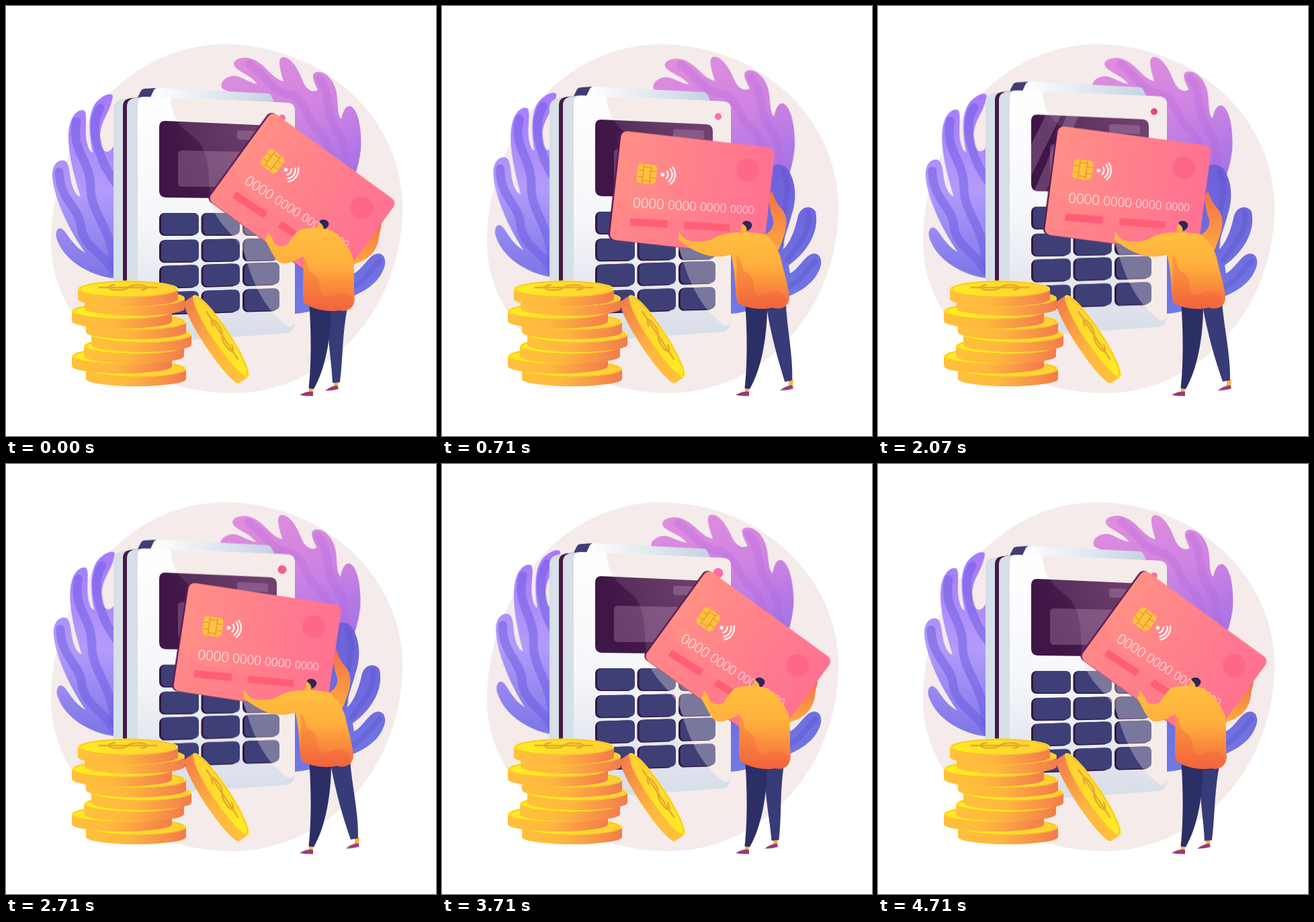
An HTML page without scripts that plays this animation: 640x640 px, repeating every 4780 ms.

```html
<!DOCTYPE html>
<html lang="en">
<head>
<meta charset="utf-8">
<title>Card payment</title>
<style>
  html, body { margin: 0; height: 100%; overflow: hidden; background: #fff; }
  svg { display: block; width: 100vw; height: 100vh; }

  :root { --loop: 4780ms; --sine: cubic-bezier(.37, 0, .63, 1); }
  .move { animation: var(--name) var(--loop) var(--sine) infinite; }
  .sway { animation: sway 2390ms var(--sine) infinite; }
  .left { --turn: 3deg; transform-origin: 222px 470px; }
  .right { --turn: -3.1deg; transform-origin: 392px 298px; }
  .terminal { --name: bob; }
  .light { --name: light; }
  .glint { --name: glint; animation-timing-function: linear; }
  .card { --name: card; }
  .shirt { --name: shirt; }
  .arm { --name: arm; }
  .head { --name: head; }
  .fold { --name: fold; }
  .leg { --name: leg; }
  .shoe { --name: shoe; }

  @keyframes sway { 50% { transform: rotate(var(--turn)); } }
  @keyframes bob { 50% { transform: translateY(-9.8px); } }
  @keyframes light {
    0%, 30% { r: 5px; fill: #f86fa0; }
    43% { r: 5px; fill: #e5447d; }
    67%, 74% { r: 7.5px; fill: #f86fa0; }
  }
  @keyframes glint {
    0%, 37.7% { transform: translateX(-150px); }
    52.3%, 100% { transform: translateX(260px); }
  }
  @keyframes card {
    0% { transform: translate(441px, 290px) rotate(36deg); animation-timing-function: cubic-bezier(.12, 0, .39, 0); }
    6.9% { transform: translate(407px, 273px) rotate(23deg); animation-timing-function: cubic-bezier(.61, 1, .88, 1); }
    13.8% { transform: translate(372.5px, 279.5px) rotate(6.4deg); }
    23%, 53.6% { transform: translate(372px, 274px) rotate(7.5deg); animation-timing-function: cubic-bezier(.12, 0, .39, 0); }
    67.2% { transform: translate(407.5px, 270px) rotate(25deg); animation-timing-function: cubic-bezier(.61, 1, .88, 1); }
    78.5%, 100% { transform: translate(441px, 290px) rotate(36deg); }
  }
  @keyframes shirt {
    0%, 78.5%, 100% { d: path("M436 334C444 329 468 330 481 333C494 338 510 356 517 376C519 395 517 415 519 436C518 450 508 456 496 453C480 456 458 452 444 442C440 430 444 400 442 372C432 379 418 386 408 382C398 376 394 362 386 349L390 337C394 343 399 348 399 353C404 358 414 360 420 354C426 345 430 338 436 334Z"); }
    14%, 53.6% { d: path("M428 338C440 336 462 336 480 340C492 348 500 362 504 374C508 395 516 415 517 435C516 448 504 453 492 449C476 453 452 450 440 442C436 430 437 395 430 370C418 374 402 374 388 369C374 364 362 356 352 348L353 336C355 341 360 345 364 348C372 352 388 352 400 348C410 342 420 339 428 338Z"); }
  }
  @keyframes arm {
    0%, 78.5%, 100% { d: path("M497 345C510 352 525 355 535 345C542 338 548 333 554 331L558 321C561 327 556 332 555 345C552 365 540 378 518 384C510 385 500 370 497 345Z"); }
    14%, 53.6% { d: path("M476 342C490 338 498 325 490 310C488 298 486 290 486 283L491 275C495 285 495 290 508 305C515 316 513 330 508 345C504 358 500 364 498 368C490 370 480 360 476 342Z"); }
  }
  @keyframes head { 14%, 53.6% { transform: translate(-19px, 2px); } 78.5% { transform: none; } }
  @keyframes fold { 14%, 53.6% { transform: translate(-4px, -3px); } 78.5% { transform: none; } }
  @keyframes leg {
    0%, 83.9%, 100% { d: path("M479 446C478 500 485 530 486 561L497 560C502 520 500 490 509 444Z"); }
    18.8%, 60.7% { d: path("M483 446C493 500 505 535 513 559L524 557C525 520 515 480 512 440Z"); }
  }
  @keyframes shoe { 18.8%, 60.7% { transform: translate(31px, -.5px); } 83.9% { transform: none; } }
</style>
</head>
<body>
<svg viewBox="0 0 640 640">
  <defs>
    <linearGradient id="violet" x2="0" y2="1"><stop stop-color="#a678fb"/><stop offset=".5" stop-color="#b29bfb"/><stop offset="1" stop-color="#7671e4"/></linearGradient>
    <linearGradient id="orchid" x2=".3" y2="1"><stop stop-color="#e18fdc"/><stop offset=".5" stop-color="#cf83e2"/><stop offset="1" stop-color="#a272e6"/></linearGradient>
    <linearGradient id="blue" x2="0" y2="1"><stop stop-color="#705fda"/><stop offset="1" stop-color="#7079e4"/></linearGradient>
    <linearGradient id="face" x2="0" y2="1"><stop stop-color="#fff"/><stop offset=".5" stop-color="#f6f7fa"/><stop offset="1" stop-color="#d9dde9"/></linearGradient>
    <linearGradient id="lid"><stop stop-color="#fff"/><stop offset="1" stop-color="#c6d2e2"/></linearGradient>
    <linearGradient id="screen" x2="1" y2="-.3"><stop stop-color="#3f1646"/><stop offset="1" stop-color="#6a3167"/></linearGradient>
    <linearGradient id="plastic"><stop stop-color="#ff8f85"/><stop offset="1" stop-color="#ff7192"/></linearGradient>
    <linearGradient id="rim"><stop stop-color="#ffc03b"/><stop offset=".4" stop-color="#ffb83f"/><stop offset="1" stop-color="#f27c4b"/></linearGradient>
    <linearGradient id="gold"><stop stop-color="#ffec22"/><stop offset="1" stop-color="#ffd033"/></linearGradient>
    <linearGradient id="cloth" x2="0" y2="1"><stop stop-color="#ffc03e"/><stop offset=".45" stop-color="#ffae3d"/><stop offset="1" stop-color="#f4663f"/></linearGradient>
    <linearGradient id="sleeve" x2="0" y2="1"><stop stop-color="#f2704a"/><stop offset="1" stop-color="#ffab3d"/></linearGradient>
    <clipPath id="glass"><path d="M237 171L394 178Q403 179 403 188V277Q403 287 394 287L237 285Q228 284 228 275V180Q228 171 237 171Z"/></clipPath>
    <clipPath id="edge"><rect x="-115" y="-81.5" width="230" height="163" rx="9"/></clipPath>
    <path id="sheen" d="M245 137C247 175 268 185 285 200C306 225 300 260 305 290C310 325 345 340 356 372C366 408 384 454 422 478Q430 476 430 466V156Q430 145 419 144Z" fill="#f4ebea"/>
    <g id="keys">
      <g fill="#33163f"><rect y="-17" width="56" height="34" rx="8"/><rect x="62.500" y="-17" width="54" height="34" rx="8"/><rect x="124" y="-17" width="52" height="34" rx="8"/></g>
      <g fill="#3f3f78"><rect x="3" y="-17" width="56" height="32.5" rx="7"/><rect x="65.500" y="-17" width="54.500" height="32.5" rx="7"/><rect x="127" y="-17" width="52" height="32.5" rx="7"/></g>
    </g>
    <g id="coin">
      <path d="M-74.5 0V15A74.5 11 0 0 0 74.5 15V0Z" fill="url(#rim)"/>
      <ellipse rx="74.5" ry="12.5" fill="#ffe62c"/>
      <ellipse cy=".5" rx="71.500" ry="11.3" fill="url(#gold)" stroke="#f6b036"/>
      <path d="M9-9C5-16-10-15-9-6C-8 2 9-2 9 7C9 15-6 16-10 9M0-21V21" transform="translate(0 -2) scale(2.1 .42) rotate(90)" fill="none" stroke="#e6a930" stroke-width="2.5" vector-effect="non-scaling-stroke"/>
    </g>
  </defs>

  <path d="M325 57A265 243 0 0 1 590 300A252 276 0 0 1 338 576A271 224 0 0 1 67 352A258 295 0 0 1 325 57Z" fill="#f4ebea"/>

  <g class="sway left">
    <path fill="url(#violet)" d="M165 406C120 402 84 375 75 345C73 335 77 330 82 331C91 335 97 356 118 367C98 340 72 290 69 255C68 235 78 228 87 230C95 234 94 250 98 265C101 276 106 283 111 284C97 240 87 195 97 170C103 156 112 153 117 156C122 165 116 185 121 205C123 213 126 218 129 218C121 180 123 150 140 138C150 130 158 130 159 134C155 160 140 170 140 195C140 225 160 225 166 190L200 190V420Z"/>
    <g fill="none" stroke="#6a5be0" stroke-opacity=".5" stroke-width="13" stroke-linecap="round">
      <path d="M105 172C96 215 126 230 126 270C126 310 158 330 160 385"/>
      <path d="M79 247C80 290 110 300 112 330C116 360 148 370 160 396"/>
      <path d="M140 152C122 180 140 235 165 265"/>
    </g>
  </g>

  <g class="sway right">
    <path fill="url(#orchid)" d="M322 123C316 112 330 103 342 104C354 107 362 114 374 116C362 100 340 97 339 86C340 79 348 77 358 77C385 80 393 108 413 112C408 95 403 78 412 76C424 76 434 92 441 110C446 124 456 130 464 125C457 110 453 100 463 98C478 97 492 115 493 137C494 152 494 165 499 168C502 155 506 148 513 149C525 155 530 185 528 215C525 240 515 270 500 292L430 300L400 160Z"/>
    <path fill="none" stroke="#b063dc" stroke-opacity=".28" stroke-width="12" stroke-linecap="round" d="M362 86C385 100 395 130 425 132C450 145 445 170 465 185C490 210 475 240 495 265M466 108C485 130 475 160 492 185C510 205 500 230 510 250"/>
  </g>

  <path fill="url(#blue)" d="M430 458V300L480 250C488 234 505 232 514 242C528 262 528 290 520 312C514 335 508 345 508 362C520 350 526 330 530 312C535 297 550 296 556 306C562 335 545 365 516 386L518 398C530 392 538 375 548 370C558 365 566 372 564 385C558 412 530 428 505 436C480 446 455 456 430 458Z"/>
  <path fill="none" stroke="#5a52c8" stroke-opacity=".35" stroke-width="8" stroke-linecap="round" d="M508 246C525 280 500 310 506 355M546 308C550 335 530 355 514 378M556 380C540 395 535 410 512 420"/>

  <g class="move terminal">
    <path d="M194 140L201 126Q203 123 208 123L224 122L218 140Z" fill="#3f3d73"/>
    <path d="M214 138L220 125Q222 122 226 122L388 130Q393 130 395 134L400 145Z" fill="url(#lid)"/>
    <path d="M160 154Q160 142 172 139L205 135L240 490L416 478L430 474Q426 487 416 487L160 505Z" fill="#d7dfe9"/>
    <path d="M174 505V149Q174 138 187 137L200 136L190 505Z" fill="#441a45"/>
    <path d="M180 505V149Q180 136 200 136L240 140V500Z" fill="#d7dfe9"/>
    <path d="M196 495V147Q196 135 208 135L419 144Q430 145 430 156V466Q430 477 419 478Z" fill="url(#face)"/>
    <use href="#sheen"/>
    <use href="#keys" transform="translate(228 325)"/>
    <use href="#keys" transform="translate(228 365.5) skewY(-1)"/>
    <use href="#keys" transform="translate(228 404) skewY(-1.8)"/>
    <use href="#keys" transform="translate(228 443) skewY(-1.9)"/>
    <use href="#sheen" opacity=".32"/>
    <g clip-path="url(#glass)">
      <path d="M228 165H404V290H228Z" fill="url(#screen)"/>
      <path d="M262 215L400 218V269H262Q256 269 256 263V221Q256 215 262 215ZM349 185L386 187Q390 187 390 191V200L349 199Q344 199 344 195V189Q344 185 349 185Z" fill="#a778a4" opacity=".42"/>
      <use href="#sheen" opacity=".1"/>
      <path class="move glint" d="M212 232L245 165H268L212 278ZM218 300L276 165H294L236 300Z" fill="#e9c6f0" opacity=".22"/>
    </g>
    <circle class="move light" cx="411" cy="166.5" r="5" fill="#f86fa0"/>
  </g>

  <use href="#coin" x="193.5" y="540"/>
  <use href="#coin" x="172.5" y="521"/>
  <use href="#coin" x="190.5" y="506"/>
  <use href="#coin" x="201.5" y="489"/>
  <use href="#coin" x="193.5" y="470"/>
  <use href="#coin" x="172.5" y="454"/>
  <use href="#coin" x="191.5" y="435"/>
  <use href="#coin" x="181.5" y="421"/>
  <use href="#coin" transform="translate(320 491.5) rotate(56.5) scale(-.98 1.05)"/>

  <path class="move arm" fill="url(#sleeve)"/>

  <g class="move card">
    <rect x="-117.500" y="-81" width="230" height="163" rx="9" fill="#5e1c50"/>
    <g clip-path="url(#edge)">
      <path d="M-115-82H115V82H-115Z" fill="url(#plastic)"/>
      <path d="M-115 15C-85 50-40 30 0 50C45 68 80 35 115 55V82H-115Z" fill="#ff6f8c" opacity=".25"/>
    </g>
    <circle cx="78" cy="-44" r="17" fill="#ff6388" opacity=".8"/>
    <g transform="translate(-70.5 -21.5)">
      <rect x="-14.5" y="-14.5" width="29" height="29" rx="6" fill="#ffc23c"/>
      <path d="M-14-5H-5.500M-14 5H-5.500M5.500-5H14M5.500 5H14M-5.500-14V-10M5.500-14V-10M-5.500 10V14M5.500 10V14M-5.500-10H5.500V10H-5.500Z" fill="none" stroke="#e08a35" stroke-width="1.2"/>
    </g>
    <circle cx="-47" cy="-23" r="2.8" fill="#fff"/>
    <path d="M-41-29a8.500 8.500 0 0 1 0 11M-37-33a13 13 0 0 1 0 19M-33.500-36a18 18 0 0 1 0 25" fill="none" stroke="#fff" stroke-width="2.2" stroke-linecap="round"/>
    <g fill="#fff" font-family="'Open Sans', sans-serif" font-weight="300">
      <text transform="translate(-86 30) rotate(-3)" font-size="20.5">0000</text>
      <text transform="translate(-34 27) rotate(-3)" font-size="18.8">0000</text>
      <text transform="translate(14 24) rotate(-3)" font-size="17.3">0000</text>
      <text transform="translate(59 21.5) rotate(-3)" font-size="15.7">0000</text>
    </g>
    <g fill="#ff5f76" transform="rotate(-3)"><rect x="-90" y="42" width="56" height="11" rx="1"/><rect x="-9" y="42" width="68" height="11" rx="1"/></g>
  </g>

  <path d="M451 566H458L456 576H451Z" fill="#ffb13d"/>
  <path d="M437 579Q447 573 457 574L457 580.5Q447 581 437 579Z" fill="#9c3a76"/>
  <g class="move shoe">
    <path d="M488 556H495L494 568H488Z" fill="#ffb13d"/>
    <path d="M475 572.5Q484 565 493.5 565L495 570Q484 573 475 572.5Z" fill="#9c3a76"/>
  </g>
  <path class="move leg" fill="#373b78"/>
  <path d="M451 440C455 490 454 540 450.5 569L458 570C476 540 484 490 484 448Z" fill="#2c2f66"/>

  <g class="move head">
    <path d="M463 334L465 323L475 326L473 335Z" fill="#ffb13d"/>
    <path d="M466 321C469 316 477 317 480 322C482 327 477 332 472 333C474 328 470 325 466 321Z" fill="#2b2758"/>
  </g>
  <path class="move shirt" fill="url(#cloth)"/>
  <path class="move fold" d="M442 374C454 382 444 393 459 400C472 410 464 428 474 433C484 435 494 423 509 430C521 438 517 454 496 452C480 456 458 452 444 444C442 430 444 400 442 374Z" fill="#ef5f3c" opacity=".32"/>
</svg>
</body>
</html>
```
